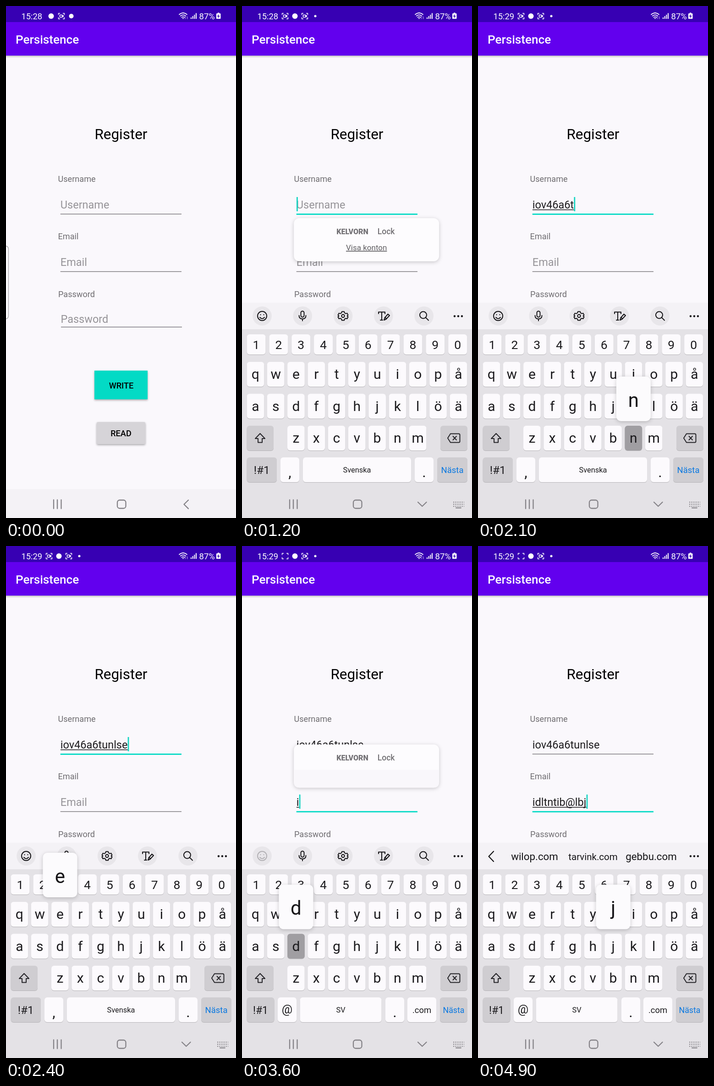
Animation of 502x1115 px, one loop 5000 ms. Source, as an HTML page:

```html
<!DOCTYPE html>
<html lang="sv">
<head>
<meta charset="utf-8">
<title>Persistence</title>
<style>
  html, body { margin: 0; width: 100%; height: 100%; overflow: hidden; background: #faf8fc; }
  svg { display: block; width: 502px; height: 1115px; font-family: Roboto, sans-serif; }
  .line { fill: none; stroke-linecap: round; stroke-linejoin: round; }
  .mid { text-anchor: middle; }
  .medium { font-weight: 500; }
  .label { font-size: 18.1px; fill: #6f6d71; }
  .input { font-size: 23.5px; fill: #1c1b1d; }
  .hint { fill: #969498; }
  .raised { filter: drop-shadow(0 2px 2px #0005); }
  .key { filter: drop-shadow(0 1px .6px #0003); }
  .card { filter: drop-shadow(0 2px 4px #0003); }
  .dark { fill: #151417; }
</style>
</head>
<body>
<svg id="stage" viewBox="0 0 502 1115">
  <defs>
    <linearGradient id="fade" x2="0" y2="1">
      <stop stop-color="#000" stop-opacity=".22"/><stop offset="1" stop-color="#000" stop-opacity="0"/>
    </linearGradient>
    <path id="corners" class="line" stroke="#fff" stroke-width="1.4" d="M-6.5-3v-3h3M3.500-6h3v3M6.500 3v3h-3M-3.500 6h-3v-3"/>
    <path id="camera" class="line" stroke="#fff" stroke-width="1.4" d="M-3.500-2.500h5v5h-5zM1.500 0l2.500-2v4z"/>
  </defs>
  <rect width="502" height="1115" fill="#faf8fc"/>

  <!-- form -->
  <text class="mid" x="251" y="290" font-size="31.4">Register</text>
  <text class="label" x="113.500" y="383">Username</text>
  <text class="label" x="113.500" y="508">Email</text>
  <text class="label" x="114" y="634">Password</text>
  <g id="fields"></g>
  <text class="input hint" x="119.500" y="690">Password</text>
  <rect x="120" y="698.500" width="264" height="1.400" fill="#777579"/>
  <rect class="raised" x="193" y="794" width="116" height="62.500" fill="#03dac5"/>
  <text class="mid medium" x="251.500" y="832.500" font-size="18.200">WRITE</text>
  <rect class="raised" x="198" y="906" width="106" height="48" rx="2.500" fill="#d6d4d8"/>
  <text class="mid medium" x="251" y="937" font-size="18.200">READ</text>

  <!-- bars -->
  <rect y="108" width="502" height="5" fill="url(#fade)"/>
  <rect y="35" width="502" height="73" fill="#6200ee"/>
  <text class="medium" x="21" y="81.500" font-size="26.100" fill="#fff">Persistence</text>
  <rect width="502" height="35" fill="#3700b3"/>
  <g fill="#fff">
    <text id="clock" x="33.500" y="28.500" font-size="18.300"></text>
    <text x="421.500" y="28.500" font-size="18.500">87%</text>
    <g id="idleIcons">
      <circle cx="98.500" cy="22" r="6"/>
      <use href="#corners" x="121" y="22"/><use href="#camera" x="121" y="22"/>
      <circle cx="142.500" cy="22" r="5"/>
    </g>
    <g id="busyIcons">
      <use href="#corners" x="94" y="22"/><use id="rec" href="#camera" x="94" y="22"/>
      <circle cx="115.500" cy="22" r="6"/>
      <use href="#corners" x="137" y="22"/><use href="#camera" x="137" y="22"/>
      <circle cx="160" cy="22" r="2.500"/>
    </g>
    <path class="line" stroke="#fff" stroke-width="1.700" d="M378 18.500q8.500-7 17 0M380.700 21.700q5.800-4.800 11.600 0M383.400 24.700q3.100-2.400 6.200 0"/>
    <circle cx="386.500" cy="27" r="1.300"/>
    <path class="line" stroke="#b9a4e4" stroke-width="1.200" d="M391 23v5M395.500 23v5"/>
    <path d="M403 25h2v3h-2zM406.700 22h2v6h-2zM410.400 19h2v9h-2zM414 15.500h2v12.500h-2z"/>
    <path d="M459 17.500q0-1.500 1.500-1.500h1.500v-1.500h3.500v1.500h1.500q1.500 0 1.500 1.500v9q0 1.500-1.500 1.500h-6.500q-1.500 0-1.500-1.500z"/>
    <path fill="#3700b3" d="M464.700 17.500l-4 5.500h2.800l-.7 4 4-5.500h-2.800z"/>
  </g>

  <!-- autofill card -->
  <g id="autofill">
    <rect class="card" x="-158.500" y="-47" width="317" height="94" rx="12" fill="#fdfcfe"/>
    <path id="cardFoot" fill="#f9f7fb" d="M-158.500 8h317v27q0 12-12 12h-293q-12 0-12-12z"/>
    <text x="-65.500" y="-12" font-size="16" font-weight="900" fill="#737175">KELVORN</text>
    <text class="medium" x="24" y="-12" font-size="17.500" fill="#737175">Lock</text>
    <text id="accounts" class="mid" y="23" font-size="17" fill="#5f5d61" text-decoration="underline">Visa konton</text>
  </g>

  <!-- keyboard -->
  <rect y="1052" width="502" height="63" fill="#f4f2f6"/>
  <g id="keyboard">
    <rect y="646" width="502" height="58" fill="#f4f2f6"/>
    <rect y="704" width="502" height="420" fill="#e4e2e6"/>
    <g id="tools">
      <g id="discs" fill="#e8e6ea"></g>
      <g class="line" stroke="#151417" stroke-width="2">
        <g id="smiley"><circle cx="44" cy="675" r="10"/><path d="M39 678q5 6 10 0M40.500 672v.5M47.500 672v.5"/></g>
        <rect x="128.500" y="664.500" width="7" height="13" rx="3.500"/><path d="M124.500 674q0 7.500 7.500 7.500t7.500-7.500M132 682v3.500"/>
        <path d="M218 665.500h5l1 3 2.500 1.400 3-.8 2 4-2 1.900 2 2-2 4-3-.8-2.500 1.400-1 3h-5l-1-3-2.500-1.400-3 .8-2-4 2-2-2-1.900 2-4 3 .8 2.500-1.400z"/><circle cx="220.500" cy="675" r="3.200"/>
        <path d="M298 670v-3.500h14v3.500M305 667v17M302 684h5M310 684l1.500-5 7-8 3.500 3-7.500 8zM312 678l3 3"/>
        <circle cx="395.500" cy="673" r="7.500"/><path d="M401 678.500l6 6"/>
      </g>
    </g>
    <g id="suggest">
      <path class="line" stroke="#151417" stroke-width="2.200" d="M34 665l-10.500 11L34 687"/>
    </g>
    <g id="dots"><circle cx="464" cy="675.500" r="2.200"/><circle cx="472" cy="675.500" r="2.200"/><circle cx="480" cy="675.500" r="2.200"/></g>
    <g id="keys"></g>
    <g class="line" stroke="#252428" stroke-width="2">
      <path d="M39.500 931l-10.500 11h6v8.500h9v-8.500h6z"/>
      <path d="M449 941l6-9.500h18q2.500 0 2.500 2.500v14q0 2.500-2.500 2.500h-18zM460.500 937l7.500 8M468 937l-7.500 8"/>
    </g>
  </g>

  <!-- navigation -->
  <g class="line" stroke="#858388" stroke-width="2.300" stroke-linecap="butt">
    <path d="M104 1075.500v19M112 1075.500v19M120.500 1075.500v19"/>
    <rect x="243" y="1076" width="18.500" height="18" rx="5"/>
    <path id="back" d="M398 1076l-9.500 9.300 9.500 9.300"/>
    <g id="hide">
      <path d="M384 1080.500l9.300 9 9.300-9"/>
      <path stroke-linecap="butt" stroke-width="2" stroke-dasharray="2.300 2.300" d="M461 1080.500h24M461 1085h24M461 1089.500h24"/>
      <path stroke-width="1.800" d="M467 1093h11"/>
    </g>
  </g>
  <path id="handle" d="M-2 523h3q4.500 1 4.500 7v144q0 6-4.500 7h-3z" fill="#fbfafc" stroke="#a5a3a7" stroke-width="1.300"/>

  <g id="bubble">
    <rect class="card" width="75" height="97" rx="10" fill="#fcfbfd"/>
    <text class="mid dark" x="37.500" y="65.500" font-size="42"></text>
  </g>
</svg>

<script>
const $ = id => document.getElementById(id);
const show = (el, on) => { el.style.display = on ? '' : 'none'; };
const span = (t, a, b) => t >= a && t < b;

function add(parent, tag, attrs, text) {
  const el = document.createElementNS('http://www.w3.org/2000/svg', tag);
  for (const k in attrs) el.setAttribute(k, attrs[k]);
  if (text) el.textContent = text;
  return parent.appendChild(el);
}

// Keys
const KEY = '#fcfafd', GREY = '#cfcdd1', DOWN = '#a09ea2', BLUE = '#0a78e0';
const keys = {};

function addKey(parent, name, x, y, w, h, size, base, fill = KEY, ink = '#1b1a1d') {
  const rect = add(parent, 'rect', { class: 'key', x, y, width: w, height: h, rx: 6, fill });
  if (size) add(parent, 'text', { class: 'mid', x: x + w / 2, y: y + base, 'font-size': size, fill: ink }, name);
  return keys[name] = { rect, fill, x: x + w / 2, y };
}

function addRow(chars, x, y, step, w, h, size, base) {
  [...chars].forEach((c, i) => addKey($('keys'), c, x + i * step, y, w, h, size, base));
}

addRow('1234567890', 10.5, 715, 48.85, 41, 44, 26.5, 32);
addRow('qwertyuiopå', 10.5, 775, 44.3, 37.7, 54, 30, 37);
addRow('asdfghjklöä', 10.5, 844.5, 44.3, 37.7, 54, 30, 37);
addRow('zxcvbnm', 99, 914, 44.3, 37.7, 54, 30, 37);
addKey($('keys'), 'shift', 10.5, 914, 58.5, 54, 0, 0, GREY);
addKey($('keys'), 'erase', 433, 914, 59, 54, 0, 0, GREY);

const textRow = add($('keys'), 'g');
const mailRow = add($('keys'), 'g');
const bottomKey = (row, name, x, w, size, base, fill, ink) =>
  addKey(row, name, x, 983, w, 54, size, base, fill, ink);
bottomKey(textRow, '!#1', 10.5, 65.5, 24.4, 36, GREY);
bottomKey(textRow, ',', 84, 41, 32, 43);
bottomKey(textRow, 'Svenska', 133, 236, 16.4, 33);
bottomKey(textRow, '.', 377, 41, 32, 43);
const next = bottomKey(textRow, 'Nästa', 426, 66, 18.5, 34, GREY, BLUE);
bottomKey(mailRow, '!#1', 10.5, 60, 23, 36, GREY);
bottomKey(mailRow, '@', 78, 41, 26, 35);
bottomKey(mailRow, 'SV', 126.5, 178, 16.3, 33);
bottomKey(mailRow, '.', 313, 41, 32, 43);
bottomKey(mailRow, '.com', 361, 63, 18.4, 34);
bottomKey(mailRow, 'Nästa', 432, 60, 17.8, 34, GREY, BLUE);

for (let i = 0; i < 5; i++) add($('discs'), 'circle', { cx: 44 + i * 88.3, cy: 675, r: 20.8 });

const suggestion = (x, size, text) =>
  add($('suggest'), 'text', { class: 'mid dark', x, y: 684, 'font-size': size }, text);
const word = suggestion(123.5, 22.3);
const domains = [
  suggestion(123.5, 22.3, 'wilop.com'),
  suggestion(251, 20.5, 'tarvink.com'),
  suggestion(378, 22.3, 'gebbu.com')
];

// Input fields
function makeField(hint, base) {
  const g = $('fields');
  return {
    text: add(g, 'text', { class: 'input', x: 118.8, y: base }),
    under: add(g, 'rect', { x: 119, y: base + 2, height: 1.5, fill: '#1c1b1d' }),
    line: add(g, 'rect', { x: 118.7, width: 264.3 }),
    caret: add(g, 'rect', { y: base - 25, width: 2.8, height: 31, fill: '#16d5c2' }),
    hint, base
  };
}
const user = makeField('Username', 441);
const mail = makeField('Email', 566.3);

function drawField(f, value, focused, caretOn) {
  f.text.textContent = value || f.hint;
  f.text.setAttribute('class', value ? 'input' : 'input hint');
  const width = value ? f.text.getComputedTextLength() : 0;
  show(f.under, focused && value);
  f.under.setAttribute('width', width);
  f.line.setAttribute('y', f.base + (focused ? 11 : 11.4));
  f.line.setAttribute('height', focused ? 2.8 : 1.4);
  f.line.setAttribute('fill', focused ? '#03dac5' : '#777579');
  show(f.caret, focused && caretOn);
  f.caret.setAttribute('x', 119 + width);
}

// Typing: each key goes down at its time and enters its character HOLD later
const LOOP = 5000, HOLD = 100, LINGER = 200;
const FOCUS_USER = 200, FOCUS_MAIL = 3000;
const press = (chars, times) => [...chars].map((c, i) => ({ c, at: times[i] }));
const userKeys = press('iov46a6tunlse',
  [1400, 1500, 1550, 1600, 1700, 1800, 1900, 2000, 2050, 2100, 2150, 2200, 2300]);
const mailKeys = press('idltntib@lbj',
  [3500, 3600, 3700, 3800, 3900, 4000, 4050, 4100, 4500, 4600, 4700, 4800]);
const allKeys = [...userKeys, ...mailKeys];
const typed = (list, t) => list.filter(k => t >= k.at + HOLD).map(k => k.c).join('');

function drawKeys(t) {
  for (const k in keys) keys[k].rect.setAttribute('fill', keys[k].fill);
  next.rect.setAttribute('fill', span(t, 2800, 2900) ? DOWN : GREY);
  const last = allKeys.filter(k => k.at <= t).pop();
  const active = last && t < last.at + LINGER;
  show($('bubble'), active);
  if (!active) return;
  const key = keys[last.c];
  if (t < last.at + HOLD) key.rect.setAttribute('fill', DOWN);
  $('bubble').setAttribute('transform', `translate(${key.x - 37.5} ${key.y - 107})`);
  $('bubble').lastElementChild.textContent = last.c;
}

function drawAutofill(t) {
  const onMail = t >= FOCUS_MAIL;
  const on = span(t, 500, 1500) || span(t, 3100, 3700);
  const opening = span(t, 500, 600) || span(t, 3100, 3200);
  const closing = span(t, 3600, 3700);
  show($('autofill'), on);
  show($('accounts'), !closing);
  show($('cardFoot'), closing);
  $('autofill').setAttribute('opacity', opening ? 0.82 : 1);
  $('autofill').setAttribute('transform',
    `translate(271.7 ${onMail ? 479.3 : 509}) scale(${opening ? 0.972 : 1})`);
}

function draw(t) {
  const open = t >= 200;
  const slide = t < 600 ? 469 * Math.exp(-(t - 150) / 86) : 0;
  $('clock').textContent = t < 2000 ? '15:28' : '15:29';
  show($('idleIcons'), t < 300);
  show($('busyIcons'), t >= 300);
  show($('rec'), t % 1000 < 500);

  show($('keyboard'), open);
  $('keyboard').setAttribute('transform', `translate(0 ${slide})`);
  show($('back'), !open);
  show($('hide'), open);
  show($('handle'), t < 700);

  const onMail = t >= FOCUS_MAIL;
  const name = typed(userKeys, t), address = typed(mailKeys, t);
  const edits = allKeys.map(k => k.at + HOLD).concat(FOCUS_USER, FOCUS_MAIL);
  const lastEdit = Math.max(...edits.filter(e => e <= t), 0);
  const caretOn = (t - lastEdit) % 1000 < 500;
  drawField(user, name, open && !onMail, caretOn);
  drawField(mail, address, onMail, caretOn);

  const hasDomain = address.includes('@');
  const suggesting = t >= 3700;
  show(textRow, !onMail);
  show(mailRow, onMail);
  show($('tools'), !suggesting);
  show($('suggest'), suggesting);
  $('smiley').setAttribute('opacity', span(t, 3600, 3700) ? 0.25 : 1);
  $('dots').setAttribute('fill', suggesting && !hasDomain ? '#c3c1c5' : '#151417');
  word.textContent = hasDomain ? '' : address;
  domains.forEach(d => show(d, hasDomain));

  drawAutofill(t);
  drawKeys(t);
}

const start = performance.now();
let shown = -1;
function tick() {
  const t = Math.floor((performance.now() - start) % LOOP / 100) * 100;
  if (t !== shown) draw(shown = t);
  requestAnimationFrame(tick);
}
tick();
</script>
</body>
</html>
```
